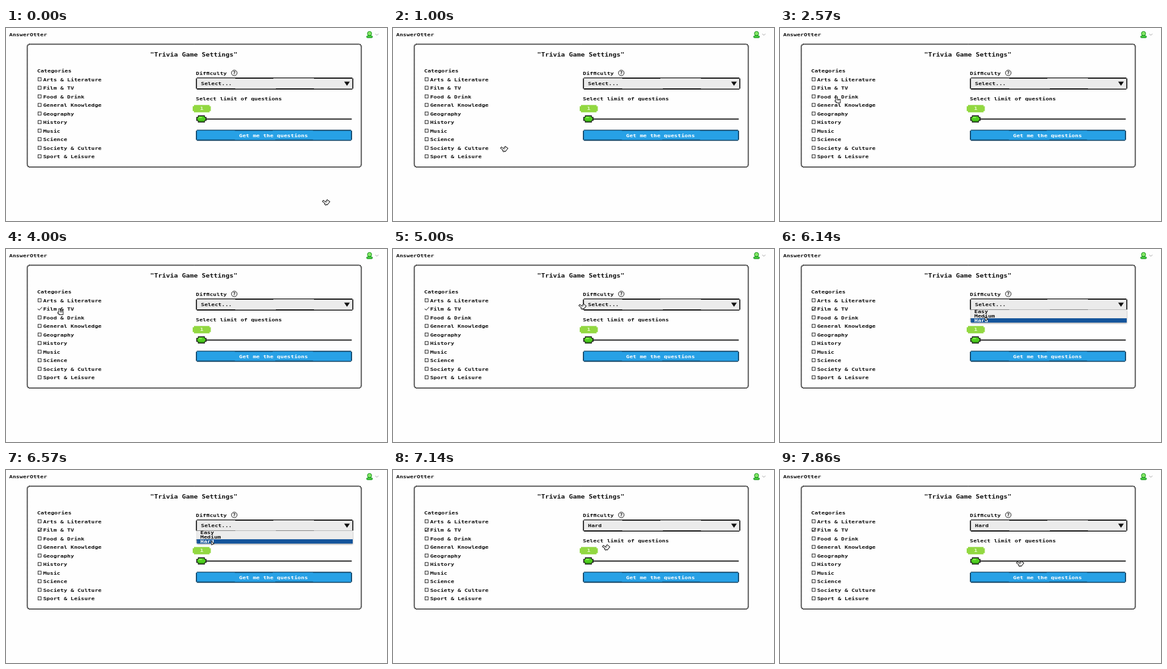
Write an HTML page with a canvas that moves like this. It is 600 by 304 pixels and loops after 8000 ms.

```html
<!DOCTYPE html>
<html lang="en">
<head>
<meta charset="utf-8">
<title>Trivia Game Settings</title>
<style>
html, body { margin: 0; width: 100%; height: 100%; overflow: hidden; background: #fefefe; }
canvas { display: block; width: 600px; height: 304px; }
</style>
</head>
<body>
<canvas id="stage" width="600" height="304"></canvas>
<script>
const ctx = document.getElementById('stage').getContext('2d');
const LOOP = 8000, STEP = 1000 / 7;
const INK = '#111', PAPER = '#fefefe';
const CATEGORIES = ['Arts & Literature', 'Film & TV', 'Food & Drink', 'General Knowledge',
  'Geography', 'History', 'Music', 'Science', 'Society & Culture', 'Sport & Leisure'];
const LEVELS = ['Easy', 'Medium', 'Hard'];

// Times in steps
const CHECK = 28, OPEN = 38, CHOOSE = 47;
const START = { x: 504, y: 274 };
const MOVES = [
  { from: 0, to: 5, x: 243, y: 208 },
  { from: 6, to: 8, x: 107, y: 172 },
  { from: 9, to: 15, x: 92, y: 116 },
  { from: 16, to: 24, x: 86, y: 99 },
  { from: 31, to: 36, x: 323, y: 89 },
  { from: OPEN, to: 45, x: 325, y: 115 },
  { from: 48, to: 55, x: 378, y: 147 },
];

function rect(x, y, w, h, color) {
  ctx.fillStyle = color;
  ctx.fillRect(x, y, w, h);
}

// Flattened monospace gives the low, wide letters
function text(s, x, y, { size = 9, color = INK } = {}) {
  ctx.save();
  ctx.translate(x, y);
  ctx.scale(1, 0.8);
  ctx.font = `bold ${size}px "DejaVu Sans Mono", monospace`;
  ctx.fillStyle = color;
  ctx.fillText(s, 0, 0);
  ctx.restore();
}

function line(color, width, ...points) {
  ctx.beginPath();
  points.forEach(p => ctx.lineTo(...p));
  ctx.strokeStyle = color;
  ctx.lineWidth = width;
  ctx.stroke();
}

function triangle(color, ...points) {
  ctx.beginPath();
  points.forEach(p => ctx.lineTo(...p));
  ctx.closePath();
  ctx.fillStyle = color;
  ctx.fill();
}

function ring(x, y, r, color, fill = PAPER) {
  ctx.beginPath();
  ctx.arc(x, y, r, 0, 2 * Math.PI);
  ctx.fillStyle = fill;
  ctx.fill();
  ctx.strokeStyle = color;
  ctx.lineWidth = 1;
  ctx.stroke();
}

// Box with notched corners
function block(x, y, w, h, notch, color) {
  rect(x + notch, y, w - 2 * notch, h, color);
  rect(x, y + notch, w, h - 2 * notch, color);
}

// Hand-drawn frame: every second quarter of the long edges is heavier
function frame(x, y, w, h, fill, edge) {
  block(x, y, w, h, 1.5, edge);
  rect(x + 1.6, y + 1.2, w - 3.2, h - 2.6, fill);
  const q = w / 4;
  for (const i of [1, 3]) {
    rect(x + i * q, y + 1, q - 2, 0.8, edge);
    rect(x + i * q - q + 2, y + h - 2, q - 2, 0.8, edge);
  }
}

function pointer(step) {
  let { x, y } = START;
  for (const m of MOVES) {
    const t = Math.min(1, Math.max(0, (step - m.from) / (m.to - m.from)));
    const k = t * t * (3 - 2 * t);
    x += (m.x - x) * k;
    y += (m.y - y) * k;
  }
  return { x, y };
}

function header() {
  text('AnswerOtter', 5, 12.5);
  ring(572.5, 8.7, 3.3, '#15921f', '#86e866');
  block(567.5, 11.8, 10, 4, 1, '#15921f');
  rect(569, 12.8, 7, 1.8, '#55dc45');
  line('#aaa', 1, [581.5, 9], [584, 11.5], [586.5, 9]);
}

function panel() {
  ctx.beginPath();
  ctx.roundRect(33.5, 25.5, 526, 193.5, 4);
  ctx.lineWidth = 1;
  ctx.strokeStyle = '#777';
  ctx.stroke();
  ctx.setLineDash([1, 1]);
  ctx.lineWidth = 2;
  ctx.strokeStyle = INK;
  ctx.stroke();
  ctx.setLineDash([]);
  text('"Trivia Game Settings"', 227, 45.3, { size: 10.4 });
}

function categories(step) {
  text('Categories', 49, 70.3);
  CATEGORIES.forEach((name, i) => {
    const y = 81 + i * 13.5, on = i === 1 && step >= CHECK;
    if (!on || step >= OPEN) {
      ctx.strokeStyle = '#222';
      ctx.lineWidth = 0.9;
      ctx.strokeRect(50.5, y - 2.8, 4.8, 5);
    }
    if (on) line(INK, 1, [50, y - 0.5], [52, y + 1.8], [57, y - 3]);
    text(name, 58.4, y + 2.6);
  });
}

function field(value) {
  text('Dif\uFB01culty', 299, 73.5);
  ring(359.5, 70.8, 4.4, '#222');
  text('?', 357, 73.4, { size: 8 });
  frame(299, 78, 248, 19, '#ebebeb', INK);
  triangle(INK, [532.5, 84.5], [541.5, 84.5], [537, 91]);
  text(value, 307, 89.7);
}

function slider() {
  text('Select limit of questions', 299, 114);
  block(294, 121.3, 28.5, 11.5, 2, '#92d841');
  text('1', 305.5, 129.4, { color: '#e6f8cd' });
  rect(300, 142.6, 244.5, 1.7, INK);
  block(299.7, 137.6, 16, 11.2, 2.5, INK);
  block(301.2, 139, 13, 8.4, 2, '#4fce20');
  rect(303.5, 140, 5, 2, '#83ec4b');
  rect(304, 146, 7, 1.2, '#2f9d12');
}

function button() {
  frame(299, 160.3, 246, 17.4, '#27a1e6', '#123f5e');
  text('Get me the questions', 367, 171.7, { color: '#fff' });
}

function menu(y) {
  const x = 300.5, top = 95.5, w = 245.5, row = 6.8;
  ctx.save();
  ctx.shadowColor = 'rgba(0,0,0,.5)';
  ctx.shadowBlur = 2;
  ctx.shadowOffsetY = 1;
  rect(x, top, w, row * 3 + 0.5, '#ececec');
  ctx.restore();
  const active = Math.floor((y - top) / row);
  LEVELS.forEach((name, i) => {
    const hot = i === active;
    if (hot) rect(x, top + i * row, w, row, '#13549b');
    text(name, 306, top + 5.4 + i * row, { color: hot ? '#fff' : INK });
  });
}

// Finger, palm and thumb, outlined by a larger dark copy
function hand(angle) {
  ctx.rotate(angle);
  for (const [grow, color] of [[0.9, INK], [0, '#fff']]) {
    const part = (x, y, w, h) => rect(x - grow, y - grow, w + 2 * grow, h + 2 * grow, color);
    part(-2.5, -4.5, 1.5, 7);
    part(-2, -0.5, 5.5, 4.5);
    part(-3.8, 0.8, 2, 1.5);
  }
  for (const x of [-0.5, 1.5]) rect(x, -0.5, 0.6, 2, INK);
}

function cursor(step, { x, y }) {
  ctx.save();
  ctx.translate(x, y);
  if (step >= 36 && step < CHOOSE) {
    triangle(INK, [-2.5, -4], [3.5, 1], [-1.5, 3.5]);
    triangle('#fff', [-1.5, -2], [1.8, 0.8], [-1, 2]);
  } else {
    const overLabel = step >= 8 && step < 33;
    hand(overLabel ? 0 : -Math.PI / 3.5);
  }
  ctx.restore();
}

function draw(time) {
  const step = Math.floor((time % LOOP + 4) / STEP);
  const at = pointer(step);
  rect(0, 0, 600, 304, PAPER);
  header();
  panel();
  categories(step);
  field(step >= CHOOSE ? 'Hard' : 'Select...');
  slider();
  button();
  if (step >= OPEN && step < CHOOSE) menu(at.y);
  cursor(step, at);
}

let start;
function tick(now) {
  start ??= now;
  draw(now - start);
  requestAnimationFrame(tick);
}
requestAnimationFrame(tick);
</script>
</body>
</html>
```
